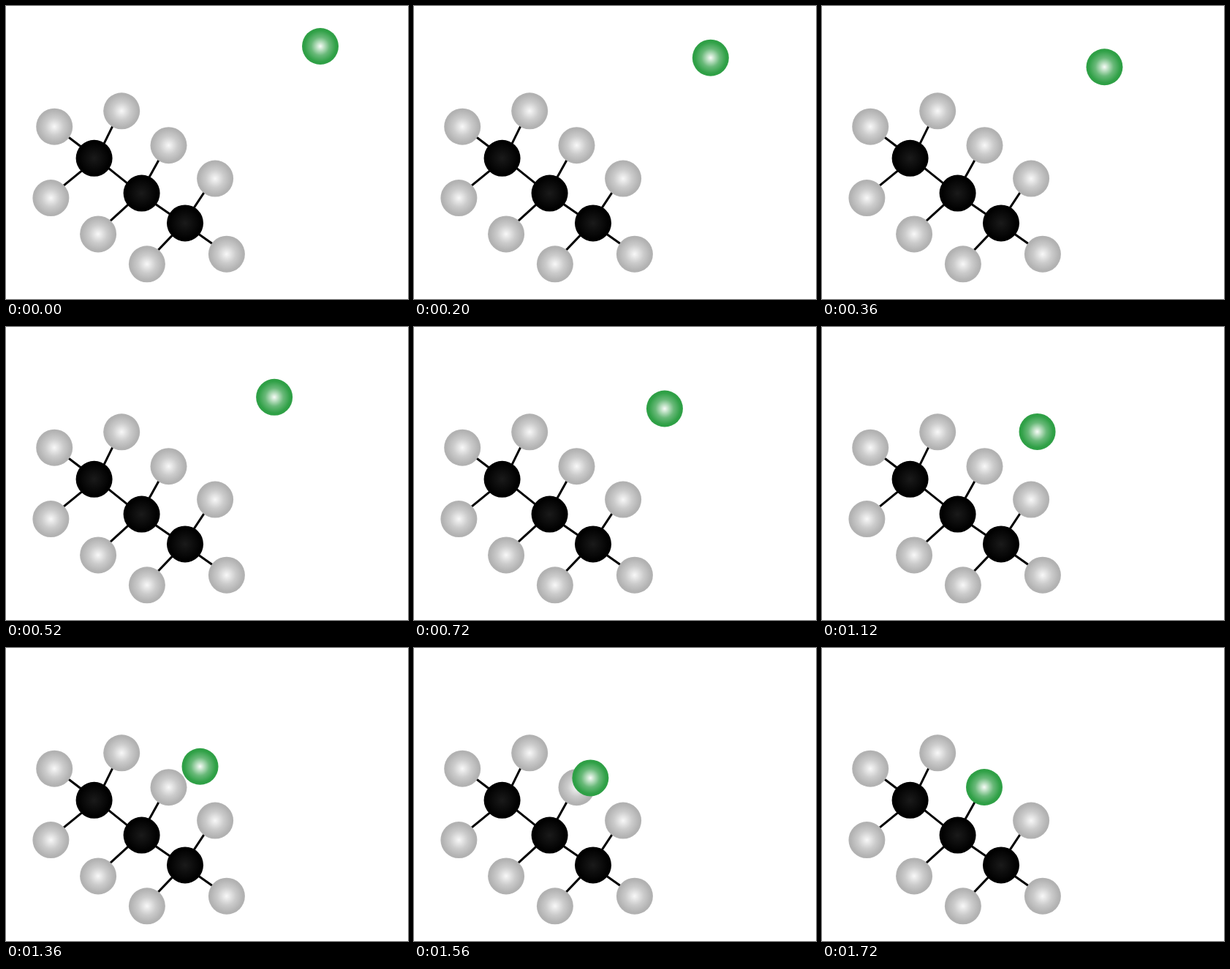
Write an HTML page that moves like this. It is 550 px wide and 400 px high and loops after 2160 ms.

```html
<!DOCTYPE html>
<html lang="en">
<head>
<meta charset="utf-8">
<title>Substitution</title>
<style>
html, body { margin: 0; width: 100%; height: 100%; overflow: hidden; background: #fff; }
svg { display: block; width: 100%; height: 100%; }
</style>
</head>
<body>
<svg id="stage" viewBox="0 0 550 400">
  <defs>
    <radialGradient id="gray">
      <stop offset="0" stop-color="#f8f8f8"/>
      <stop offset=".5" stop-color="#cbcbcb"/>
      <stop offset=".9" stop-color="#b2b2b2"/>
    </radialGradient>
    <radialGradient id="black">
      <stop offset="0" stop-color="#1a1a1a"/>
      <stop offset=".9" stop-color="#000"/>
    </radialGradient>
    <radialGradient id="green">
      <stop offset="0" stop-color="#f8fcf8"/>
      <stop offset=".5" stop-color="#69b979"/>
      <stop offset=".87" stop-color="#2fa046"/>
    </radialGradient>
  </defs>
  <g id="bonds" stroke="#000" stroke-width="3"></g>
  <g id="atoms"></g>
</svg>
<script>
const LOOP = 2160, STEP = 40, STEPS = 43, RADIUS = 25;
const START = { x: 430, y: 55 }, END = { x: 222, y: 190 };

// Each carbon: its centre, how far its bonds meet off centre, its hydrogens.
const chain = [
  { x: 120.6, y: 207.8, shift: 3.4, hydrogens: [[66.2, 164.7], [158.2, 143.3], [61.4, 262.1]] },
  { x: 185.6, y: 255.6, shift: -2, hydrogens: [[126.1, 311.4], [222.5, 190.2]] },
  { x: 245, y: 296.4, shift: -2, hydrogens: [[286.1, 235.6], [192.9, 352.3], [301.9, 338.7]] }
];

function add(parent, tag, attrs) {
  const el = document.createElementNS('http://www.w3.org/2000/svg', tag);
  for (const key in attrs) el.setAttribute(key, attrs[key]);
  return document.getElementById(parent).appendChild(el);
}

const ball = (fill, { x, y }) =>
  add('atoms', 'circle', { cx: x, cy: y, r: RADIUS, fill: `url(#${fill})` });

const bond = (a, b) =>
  add('bonds', 'line', { x1: a.x, y1: a.y, x2: b.x, y2: b.y });

const hub = carbon => ({ x: carbon.x + carbon.shift, y: carbon.y + 0.5 });

let leaving;
chain.forEach((carbon, i) => {
  const from = hub(carbon);
  if (i) bond(hub(chain[i - 1]), from);
  ball('black', carbon);
  for (const [x, y] of carbon.hydrogens) {
    bond(from, { x: x - 1.5, y: y - 1.5 });
    const atom = ball('gray', { x, y });
    if (Math.hypot(x - END.x, y - END.y) < 1) leaving = atom;
  }
});
const mover = ball('green', START);

function draw(time) {
  const step = Math.min(Math.floor((time % LOOP) / STEP), STEPS);
  const along = axis => START[axis] + (END[axis] - START[axis]) * step / STEPS;
  mover.setAttribute('cx', along('x'));
  mover.setAttribute('cy', along('y'));
  leaving.setAttribute('visibility', step < STEPS ? 'visible' : 'hidden');
}

let begin;
function tick(now) {
  begin ??= now;
  draw(now - begin);
  requestAnimationFrame(tick);
}
draw(0);
requestAnimationFrame(tick);
</script>
</body>
</html>
```
